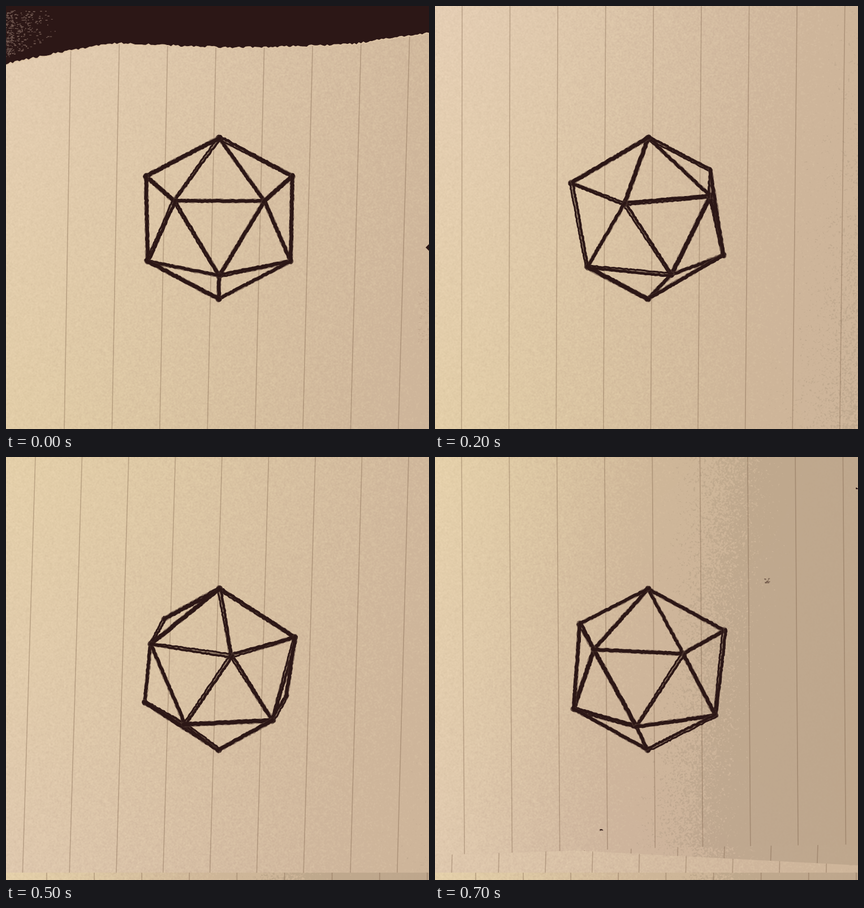
Animation of 748 by 748 pixels, one loop 800 ms. Source, as an HTML page with a canvas:

```html
<!DOCTYPE html>
<html lang="en">
<head>
<meta charset="utf-8">
<title>Rolling icosahedron</title>
<style>
html, body { margin: 0; width: 100%; height: 100%; overflow: hidden; background: #dcc4a5; }
canvas { display: block; width: 748px; height: 748px; }
</style>
</head>
<body>
<canvas id="stage" width="748" height="748"></canvas>
<script>
const S = 748, INK = '#2c1716', GREY = '#705850', FAINT = 'rgba(85,60,50,.45)';
const TONES = [[235, 213, 181], [222, 200, 168], [206, 181, 154], [191, 168, 142], [189, 165, 139]];

let seed = 7;
const rnd = () => (seed = (seed * 16807) % 2147483647) / 2147483647;
const jit = r => (rnd() - .5) * 2 * r;
const mix = (a, b, t) => a + (b - a) * t;
const clamp = (v, lo, hi) => Math.max(lo, Math.min(hi, v));

// Soft paper grain, shared by every sheet
const raw = Float32Array.from({ length: S * S }, () => rnd() - .5);
const grain = raw.map((v, i) => {
  let sum = 0;
  for (let y = 0; y < 3; y++)
    for (let x = 0; x < 3; x++) sum += raw[(i + x + y * S) % raw.length];
  return sum / 3;
});

// tone: shade at left and right; warm: pink at the top (1) or the bottom (-1)
// rule: first line at top and bottom, spacing at top and bottom
// cut: lower edge of a sheet that is shorter than the stage
const sheets = [
  { tone: [.5, 1.8], warm: 1, rule: [116, 103, 85.6, 84.4], extra: tornTop },
  { tone: [.4, 1.7], warm: 1, rule: [27, 22, 84.1, 83], extra: tornCorner },
  { tone: [.4, 2.2], warm: 1, rule: [48, 47, 84.6, 83.6] },
  { tone: [.3, 3.2], warm: 1, rule: [68, 72, 85.1, 84.1], extra: g => smudge(g, 45, 136, 22, 2, 12) },
  { tone: [.7, 1.9], warm: -1, rule: [141, 128.6, 84.6, 84.4], cut: [0,726, S,726], extra: darkSide },
  { tone: [.6, 1.9], warm: -1, rule: [52, 29, 82.5, 82.8], cut: [0,735, S,735] },
  { tone: [.5, 3.2], warm: -1, rule: [42, 15, 82.1, 82.5], cut: [0,683, S,722], extra: smears },
  { tone: [.5, 3.4], warm: -1, rule: [47, 52.5, 84.3, 84.3], cut: [0,704, 430,690, S,685], extra: specks }
];

function makeCanvas() {
  const c = document.createElement('canvas');
  c.width = c.height = S;
  return c;
}

function trace(g, p) {
  g.beginPath();
  for (let i = 0; i < p.length; i += 2) g.lineTo(p[i], p[i + 1]);
}

function fill(g, p, color) {
  trace(g, p);
  g.fillStyle = color;
  g.fill();
}

function stroke(g, p, width, color) {
  trace(g, p);
  g.lineWidth = width;
  g.strokeStyle = color;
  g.stroke();
}

function smudge(g, x, y, w, h, n, color = FAINT) {
  g.fillStyle = color;
  while (n--) g.fillRect(x + jit(w), y + jit(h), 1 + rnd() * 3, 1 + rnd());
}

function tornTop(g) {
  const rim = [];
  for (let x = 0; x <= S; x += 4) {
    const y = 70 + 33 * Math.max(0, 1 - x / 190) - 4 * Math.sin(x / 90) - Math.max(0, x - 620) / 7;
    rim.push(x, y + jit(1.8));
  }
  fill(g, [...rim, S,0, 0,0], INK);
  stroke(g, rim, 2, '#dcc3a4');
  for (let i = 0; i < 300; i++) {
    const x = rnd() * rnd() * 90;
    smudge(g, x, 8 + rnd() * (82 - x * .4), 1, 1, 1, GREY);
  }
  fill(g, [S,421, 742,427, S,433], INK);
  smudge(g, 738, 545, 10, 50, 70, '#c4aa90');
}

function tornCorner(g) {
  fill(g, [608,0, 624,13, 640,17, 655,29, 692,23, S,9, S,0], INK);
  fill(g, [0,180, 6,200, 2,204, 3,340, 0,340], GREY);
  smudge(g, 490, 569, 9, 3, 7);
}

function darkSide(g) {
  fill(g, [0,0, 20,0, 13,700, 0,700], INK);
  smudge(g, 7, 75, 8, 45, 150, GREY);
  g.save();
  g.shadowColor = 'rgba(70,45,35,.7)';
  g.shadowBlur = 8;
  g.fillStyle = INK;
  g.beginPath();
  g.moveTo(0, 698);
  g.quadraticCurveTo(72, 696, 130, 728);
  g.lineTo(0, 728);
  g.fill();
  g.restore();
  g.fillStyle = GREY;
  g.beginPath();
  g.moveTo(0, 701);
  g.quadraticCurveTo(38, 698, 70, 727);
  g.lineTo(0, 727);
  g.fill();
  smudge(g, 718, 383, 9, 14, 28);
  smudge(g, 229, 312, 11, 4, 18);
}

function smears(g) {
  fill(g, [0,214, 16,212, 8,252, 0,287, 0,270, 9,225, 0,222], INK);
  fill(g, [264,277, 287,273, 275,310, 266,340], INK);
  smudge(g, 253, 262, 24, 20, 60);
  smudge(g, 542, 545, 14, 7, 18);
}

function specks(g) {
  smudge(g, 586, 218, 4, 4, 18);
  smudge(g, 293, 659, 2, 1, 6, INK);
  smudge(g, 745, 55, 1, 1, 4, INK);
}

function paper(g, { tone, warm, rule }) {
  const img = g.createImageData(S, S), d = img.data;
  for (let i = 0; i < S * S; i++) {
    const u = i % S / S, v = i / S / S;
    const shade = clamp(mix(...tone, u) + .3 * v + grain[i] * .5, 0, 3.6);
    const k = Math.floor(shade), sharp = k === 2 ? 4 : 1;
    const f = clamp((shade - k - .5) * sharp + .5, 0, 1);
    const pink = warm * (1 - 2 * v) * (1 - u);
    [-1, -2, 4].forEach((shift, c) => {
      d[i * 4 + c] = mix(TONES[k][c], TONES[k + 1][c], f) + pink * shift;
    });
    d[i * 4 + 3] = 255;
  }
  g.putImageData(img, 0, 0);

  const [top, bottom, gapTop, gapBottom] = rule;
  for (let i = 0; i < 9; i++)
    stroke(g, [top + i * gapTop, 0, bottom + i * gapBottom, S], 1.6, 'rgba(105,80,58,.32)');
}

// Edges of the solid, turned by the angle, that touch a face seen from the front
function visibleEdges(turn) {
  const ring = (offset, y, rx, ry) => Array.from({ length: 5 }, (_, i) => {
    const a = (turn + offset + i * 72) * Math.PI / 180;
    return [377 + rx * Math.sin(a), y + ry * Math.cos(a)];
  });
  const top = [377, 233], bottom = [376, 518];
  const up = ring(-36, 313, 136, 39), low = ring(0, 440, 133, 37);
  const edges = new Map(), ids = new Map([top, bottom, ...up, ...low].map((p, i) => [p, i]));

  const face = (...p) => {
    const [a, b, c] = p;
    const facing = (b[0] - a[0]) * (c[1] - a[1]) - (b[1] - a[1]) * (c[0] - a[0]);
    if (facing <= 0) return;
    p.forEach((from, i) => {
      const pair = [from, p[(i + 1) % 3]].sort((m, n) => ids.get(m) - ids.get(n));
      edges.set(pair.map(q => ids.get(q)).join(), pair);
    });
  };
  for (let i = 0; i < 5; i++) {
    const j = (i + 1) % 5;
    face(top, up[j], up[i]);
    face(up[i], up[j], low[i]);
    face(low[j], low[i], up[j]);
    face(bottom, low[i], low[j]);
  }
  return edges.values();
}

// One hand-drawn stroke, shifted sideways by the given amounts at its ends
function pen(g, [a, b], width, off0, off1, color) {
  const dx = b[0] - a[0], dy = b[1] - a[1], len = Math.hypot(dx, dy);
  const ux = dx / len, uy = dy / len, p = [];
  for (let s = -2; s < len + 3; s += 3) {
    const o = mix(off0, off1, s / len) + jit(.8);
    p.push(a[0] + ux * s - uy * o, a[1] + uy * s + ux * o);
  }
  stroke(g, p, width, color);
}

function solid(g, turn) {
  g.lineCap = g.lineJoin = 'round';
  for (const edge of visibleEdges(turn)) {
    const width = 5.5 + rnd() * 2;
    pen(g, edge, width + 1.5, 0, 0, 'rgba(85,62,54,.55)');
    if (rnd() < .45) {
      // Gone over twice, leaving a thin gap
      const gap = 2 + rnd(), spread = rnd() * 2;
      pen(g, edge, width - 2, -gap, -1, INK);
      pen(g, edge, 3, gap, 1 + spread, INK);
    } else {
      pen(g, edge, width, jit(.6), jit(.6), INK);
    }
  }
}

// Shorter sheets leave the earlier ones showing below their cut
let last = null;
const frames = sheets.map((sheet, i) => {
  const layer = makeCanvas(), out = makeCanvas();
  const g = layer.getContext('2d'), o = out.getContext('2d');
  paper(g, sheet);
  if (sheet.extra) sheet.extra(g);
  solid(g, i * 72 / sheets.length);
  if (last) o.drawImage(last, 0, 0);
  if (sheet.cut) {
    trace(o, [...sheet.cut, S,0, 0,0]);
    o.clip();
  }
  o.drawImage(layer, 0, 0);
  return last = out;
});

const view = document.getElementById('stage').getContext('2d');
const start = performance.now();
function draw() {
  const t = performance.now() - start;
  view.drawImage(frames[Math.floor(t / 100) % frames.length], 0, 0);
  requestAnimationFrame(draw);
}
draw();
</script>
</body>
</html>
```
